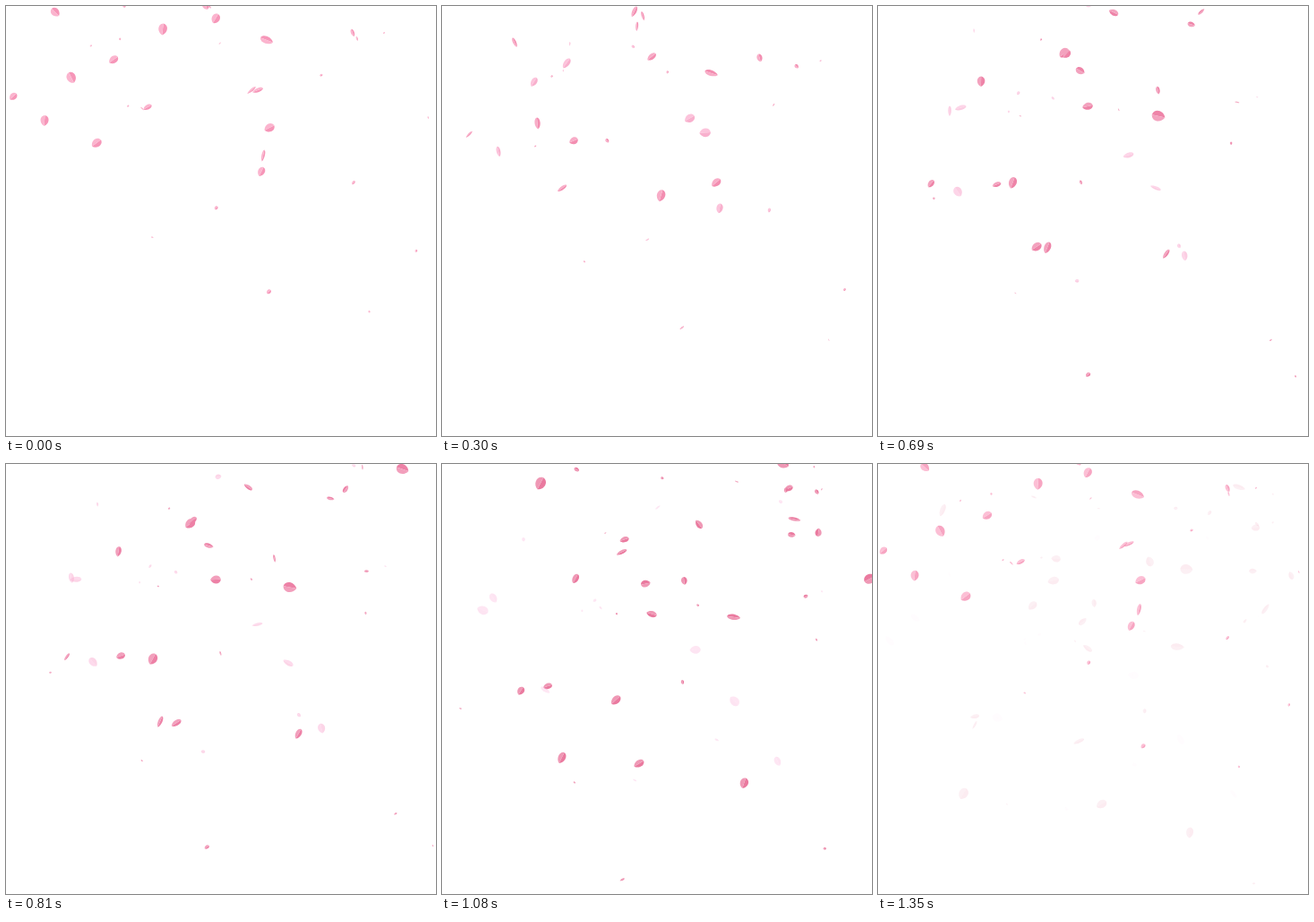
Recreate the animation shown at these times as an HTML page with a canvas. Size 480 by 480 pixels, loop 1.38 s.

```html
<!DOCTYPE html>
<html lang="en">
<head>
<meta charset="utf-8">
<title>Falling petals</title>
<style>
html, body { margin: 0; width: 100%; height: 100%; overflow: hidden; background: #fff; }
canvas { display: block; width: 480px; height: 480px; }
</style>
</head>
<body>
<canvas id="stage" width="480" height="480"></canvas>
<script>
const ctx = document.getElementById('stage').getContext('2d');
const LOOP = 1380, STEP = 30, BLEND_START = 1230;

let seed = 11;
const random = () => (seed = (seed * 16807) % 2147483647) / 2147483647;
const between = (a, b) => a + (b - a) * random();
const mix = (a, b, k) => a + (b - a) * k;

const petals = [];
function addPetal(x, y, vx, vy, size, fades) {
  petals.push({
    x, y, vx, vy, size, fades,
    angle: between(-1.2, 1.2), spin: between(-2, 2),
    flip: between(0, Math.PI), flipSpeed: between(3, 6)
  });
}

// x, y, speed x, speed y in px/s, from large to small
const lasting = [
  [291, 38, 32, 123], [261, -97, -140, 110], [291, -109, 83, 100],
  [590, -162, -182, 207], [658, -7, -167, 125], [287, 167, -142, 149],
  [73, 80, 112, 170], [220, -29, -18, 118], [101, 153, 110, 168],
  [294, 136, 40, 204], [234, 14, 0, 142], [55, 7, 87, 112],
  [221, -99, 61, 154], [223, -36, 4, 157], [223, -1, -18, 79],
  [158, 113, -37, 125], [8, 101, 74, 141], [250, -149, 127, 163],
  [256, -117, 152, 179], [387, 30, -108, 93], [278, -83, 104, 150]
];
const fading = [
  [175, 26, -120, 127], [281, 94, 42, 158], [274, 94, 8, 105],
  [43, 128, 67, 115], [120, 60, -58, 83], [285, 185, 83, 136]
];
lasting.forEach((track, i) => addPetal(...track, 15 - i * 0.32, false));
fading.forEach((track, i) => addPetal(...track, 13 - i * 0.4, true));

// Small, distant petals
for (let i = 0; i < 30; i++) {
  addPetal(between(0, 480), -120 + 480 * random() ** 1.6, between(-110, 110),
    between(90, 150), 2.5 + 4.5 * random() ** 2, i % 3 === 0);
}

function half(length, width, color) {
  const r = length / 2, w = width * 0.66;
  ctx.fillStyle = color;
  ctx.beginPath();
  ctx.moveTo(0, -r);
  ctx.bezierCurveTo(w, -r * 0.85, w, r * 0.55, 0, r);
  ctx.fill();
}

function drawPetal(p, t, opacity) {
  const s = t / 1000, age = Math.min(1, Math.max(0, t / BLEND_START));
  const width = p.size * (0.24 + 0.54 * Math.abs(Math.cos(p.flip + p.flipSpeed * s)));
  const tone = (r, g, b) => p.fades
    ? `rgb(${mix(r, 252, age)},${mix(g, 190, age)},${mix(b, 225, age)})`
    : `rgb(${mix(r, r - 14, age)},${mix(g, g - 32, age)},${mix(b, b - 28, age)})`;
  ctx.save();
  ctx.globalAlpha = opacity * (p.fades ? 1 - 0.7 * age : 1);
  ctx.translate(p.x + p.vx * s, p.y + p.vy * s);
  ctx.rotate(p.angle + p.spin * s);
  half(p.size, width, tone(246, 150, 184));
  half(p.size, -width, tone(251, 180, 206));
  ctx.restore();
}

function draw(t) {
  const blend = Math.max(0, (t - BLEND_START) / 140);
  ctx.clearRect(0, 0, 480, 480);
  for (const p of petals) {
    drawPetal(p, t, 1 - blend);
    if (blend) drawPetal(p, t - LOOP, blend);
  }
}

const start = performance.now();
function tick() {
  const t = (performance.now() - start) % LOOP;
  draw(Math.floor(t / STEP) * STEP);
  requestAnimationFrame(tick);
}
tick();
</script>
</body>
</html>
```
